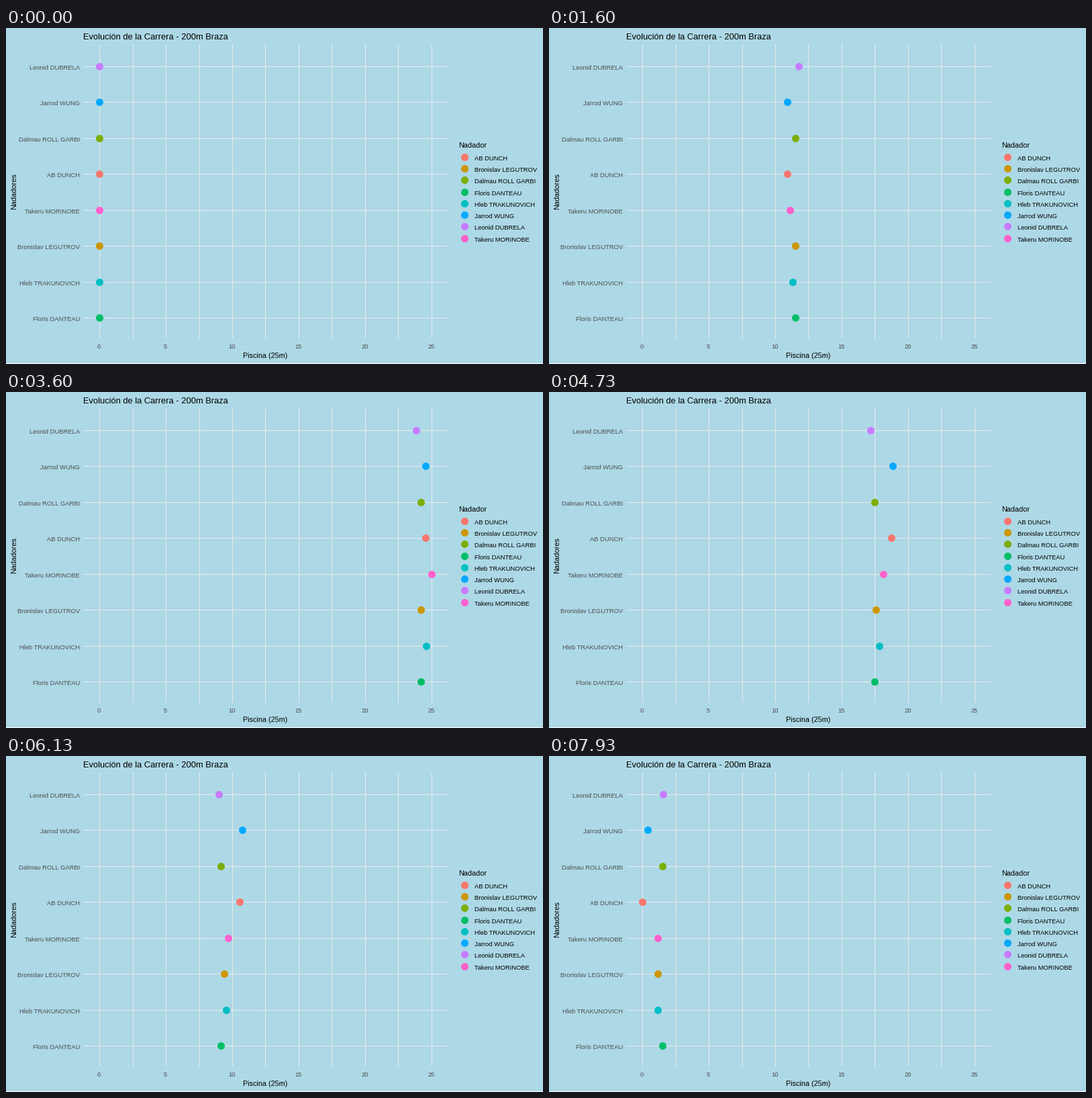
Recreate the animation shown at these times as a matplotlib script. Size 800 px wide and 500 px high, loop 8 s.

```python
import math

import matplotlib.pyplot as plt
from matplotlib.animation import FuncAnimation
from matplotlib.patches import Circle, Rectangle

W, H, DPI = 800, 500, 100
STEPS, TICKS, LOOP_MS = 120, 3, 8000   # each step lasts three ticks
POOL = 25

plt.rcParams["font.family"] = "Liberation Sans"

BACK, GRID, GREY = "#ADD8E6", "#EBEBEB", "#4D4D4D"
X0, PX_PER_M = 139.62, 19.785
Y0, ROW_GAP = 57.3, 53.45
KEY_Y0, KEY_GAP = 192.2, 17.28

# name, colour, row from the top, steps needed for each length
SWIMMERS = [
    ("AB DUNCH", "#F8766D", 3, (55, 64, 64)),
    ("Bronislav LEGUTROV", "#CD9600", 5, (52, 64, 64)),
    ("Dalmau ROLL GARBI", "#7CAE00", 2, (52, 63, 66)),
    ("Floris DANTEAU", "#00BE67", 7, (52, 63, 66)),
    ("Hleb TRAKUNOVICH", "#00BFC4", 6, (53, 63, 64)),
    ("Jarrod WUNG", "#00A9FF", 1, (55, 65, 64)),
    ("Leonid DUBRELA", "#C77CFF", 0, (51, 64, 64)),
    ("Takeru MORINOBE", "#FF61CC", 4, (54, 62, 64)),
]

fig = plt.figure(figsize=(W / DPI, H / DPI), dpi=DPI, facecolor=BACK)
ax = fig.add_axes([0, 0, 1, 1])
ax.set_xlim(0, W)
ax.set_ylim(H, 0)
ax.axis("off")


def px_x(metres):
    return math.floor(X0 + PX_PER_M * metres)


def px_y(row):
    return math.floor(Y0 + ROW_GAP * row)


def label(x, y, text, size, color="black", ha="left", **kw):
    ax.text(x, y, text, fontsize=size * 72 / DPI, color=color, ha=ha,
            va="baseline", **kw)


def bar(x, y, w, h, color=GRID):
    ax.add_patch(Rectangle((x, y), w, h, fc=color, lw=0, aa=False, zorder=1))


def dot(x, y, color):
    disc = Circle((x + 0.5, y + 0.5), 5.5, fc=color, lw=0, zorder=3)
    return ax.add_patch(disc)


def position(step, laps):
    """Distance from the starting wall, bouncing at each end of the pool."""
    for i, n in enumerate(laps):
        if step <= n:
            done = POOL * step / n
            return POOL - done if i % 2 else done
        step -= n
    return 0


bar(0, H - 1, W, 1, "white")
for i in range(11):
    bar(px_x(2.5 * i), 24, 1, 438)
for row in range(8):
    bar(115, px_y(row), 543, 1)

label(115, 17, "Evolución de la Carrera - 200m Braza", 12.85)
label(386.5, 491, "Piscina (25m)", 10.7, ha="center")
label(15, 243.5, "Nadadores", 11, ha="center", rotation=90,
      rotation_mode="anchor")
label(674.5, 178, "Nadador", 10.7)
for m in range(0, 26, 5):
    label(px_x(m) - 0.5, 477, str(m), 9.4, GREY, "center")

dots = []
for i, (name, color, row, laps) in enumerate(SWIMMERS):
    key_y = math.floor(KEY_Y0 + KEY_GAP * i)
    dot(683, key_y, color)
    label(698, key_y + 5, name, 9.4)
    label(110, px_y(row) + 5, name, 9.4, GREY, "right")
    dots.append(dot(px_x(0), px_y(row), color))


def update(tick):
    # a step begins on the tick just before its exact time
    step = min((tick + 1) // TICKS, STEPS - 1)
    for disc, (_, _, row, laps) in zip(dots, SWIMMERS):
        x = px_x(position(step, laps))
        disc.set_center((x + 0.5, px_y(row) + 0.5))
    return dots


anim = FuncAnimation(fig, update, frames=STEPS * TICKS,
                     interval=LOOP_MS / (STEPS * TICKS),
                     init_func=lambda: update(0), repeat=True, repeat_delay=0)
plt.show()
```
